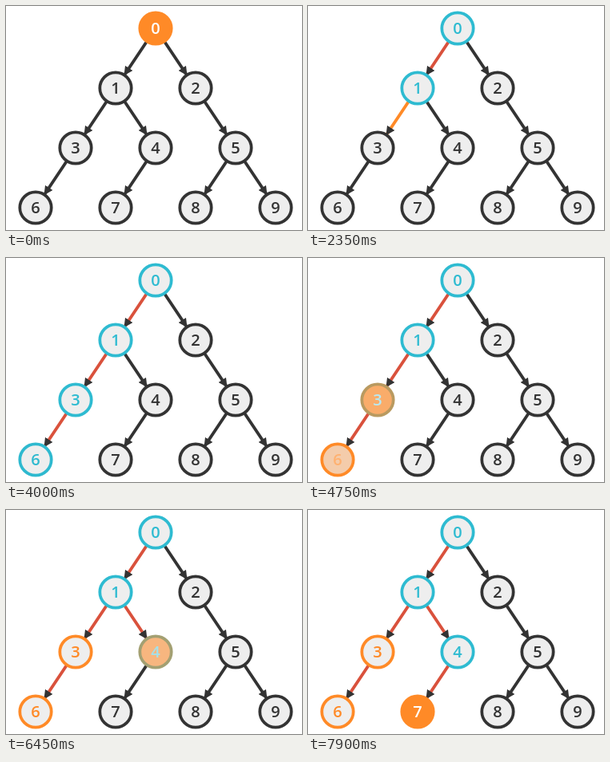
These frames come from a looping animation (370 by 281 pixels, 8 s). An HTML page:

```html
<!DOCTYPE html>
<html lang="en">
<head>
<meta charset="utf-8">
<title>Depth-first traversal</title>
<style>
  html, body { margin: 0; width: 100%; height: 100%; overflow: hidden; background: #fff; }
  svg { display: block; }
  line { stroke: #333; stroke-width: 3.75; }
  .flow { stroke: #ff8a27; stroke-width: 12.5; opacity: 0; }
  circle { stroke-width: 3.75; }
  text { font: 600 20px "Open Sans", "Noto Sans", sans-serif; text-anchor: middle; }
</style>
</head>
<body>
<svg width="370" height="281" viewBox="0 0 370 281">
  <marker id="arrow" viewBox="0 -5 10 10" refX="9" markerWidth="3" markerHeight="3" orient="auto">
    <path d="M0,-5L10,0L0,5" fill="#333"/>
  </marker>
  <g id="edges"></g>
  <g id="nodes"></g>
</svg>
<script>
const LOOP = 8000, FIRST = 701, STEP = 428.5, FADE = 345;
const EASE = 'cubic-bezier(.65, 0, .35, 1)';
const RADIUS = 19.7, EDGE_GAP = 20;
const ORANGE = '#ff8a27', RED = '#d9513c', TEAL = '#2ebbd1', DARK = '#333333', PALE = '#eeeeee';

// [fill, stroke, text]
const LOOKS = {
  idle: [PALE, DARK, DARK],
  active: [ORANGE, ORANGE, '#ffffff'],
  seen: [PALE, TEAL, TEAL],
  finished: [PALE, ORANGE, ORANGE]
};

// [column, row] of each node
const PLACES = [[3, 0], [2, 1], [4, 1], [1, 2], [3, 2], [5, 2], [0, 3], [2, 3], [4, 3], [6, 3]];
const EDGES = ['01', '02', '13', '14', '25', '36', '47', '58', '59'];

// node changes, plus an edge that is being followed or has been reached
const STEPS = [
  { 0: 'seen', follow: '01' },
  { 1: 'seen', reach: '01' },
  { 1: 'active' },
  { 1: 'seen', follow: '13' },
  { 3: 'seen', reach: '13' },
  { 3: 'active' },
  { 3: 'seen', follow: '36' },
  { 6: 'seen', reach: '36' },
  { 6: 'active' },
  { 6: 'finished', 3: 'active' },
  { 3: 'finished', 1: 'active' },
  { 1: 'seen', follow: '14' },
  { 4: 'seen', reach: '14' },
  { 4: 'active' },
  { 4: 'seen', follow: '47' },
  { 7: 'seen', reach: '47' },
  { 7: 'active' }
];

const startOf = i => FIRST + i * STEP;
const position = id => {
  const [column, row] = PLACES[id];
  return [37 + column * 50, 28 + row * 75];
};

function add(parent, tag, attributes) {
  const el = document.createElementNS('http://www.w3.org/2000/svg', tag);
  for (const name in attributes) el.setAttribute(name, attributes[name]);
  return document.getElementById(parent).appendChild(el);
}

// Plays [start, end, from, to] changes, holding each result until the next one.
function play(el, changes) {
  if (!changes.length) return;
  const frames = [{ offset: 0, ...changes[0][2] }];
  for (const [start, end, from, to] of changes) {
    frames.push({ offset: start / LOOP, ...from, easing: EASE }, { offset: end / LOOP, ...to });
  }
  frames.push({ offset: 1, ...changes[changes.length - 1][3] });
  el.animate(frames, { duration: LOOP, iterations: Infinity });
}

function drawEdge(key) {
  const [x1, y1] = position(key[0]), [x2, y2] = position(key[1]);
  const distance = Math.hypot(x2 - x1, y2 - y1);
  const dx = (x2 - x1) / distance * EDGE_GAP, dy = (y2 - y1) / distance * EDGE_GAP;
  const ends = { x1: x1 + dx, y1: y1 + dy, x2: x2 - dx, y2: y2 - dy };
  const line = add('edges', 'line', { ...ends, 'marker-end': 'url(#arrow)' });

  const followed = STEPS.findIndex(step => step.follow === key);
  if (followed < 0) return;
  const length = distance - 2 * EDGE_GAP;
  const flow = add('edges', 'line', { ...ends, class: 'flow', 'stroke-dasharray': `${length} ${length}` });
  const start = startOf(followed), end = start + FADE;
  const reached = startOf(followed + 1);

  play(line, [
    [start, start, { opacity: 1 }, { opacity: 0 }],
    [end, end, { opacity: 0 }, { opacity: 1 }]
  ]);
  play(line, [
    [start, start, { stroke: DARK }, { stroke: ORANGE }],
    [reached, reached + FADE, { stroke: ORANGE }, { stroke: RED }]
  ]);
  play(flow, [
    [start, start, { opacity: 0 }, { opacity: 1 }],
    [end, end, { opacity: 1 }, { opacity: 0 }]
  ]);
  play(flow, [[start, end, { strokeDashoffset: `${length}px` }, { strokeDashoffset: '0px' }]]);
}

function drawNode(id) {
  const [x, y] = position(id);
  let look = LOOKS[id === 0 ? 'active' : 'idle'];
  const circle = add('nodes', 'circle', { cx: x, cy: y, r: RADIUS, fill: look[0], stroke: look[1] });
  const label = add('nodes', 'text', { x, y: y + 7, fill: look[2] });
  label.textContent = id;

  const discChanges = [], textChanges = [];
  STEPS.forEach((step, i) => {
    if (!step[id]) return;
    const next = LOOKS[step[id]], start = startOf(i), end = start + FADE;
    discChanges.push([start, end, { fill: look[0], stroke: look[1] }, { fill: next[0], stroke: next[1] }]);
    textChanges.push([start, end, { fill: look[2] }, { fill: next[2] }]);
    look = next;
  });
  play(circle, discChanges);
  play(label, textChanges);
}

EDGES.forEach(drawEdge);
PLACES.forEach((_, id) => drawNode(id));
</script>
</body>
</html>
```
